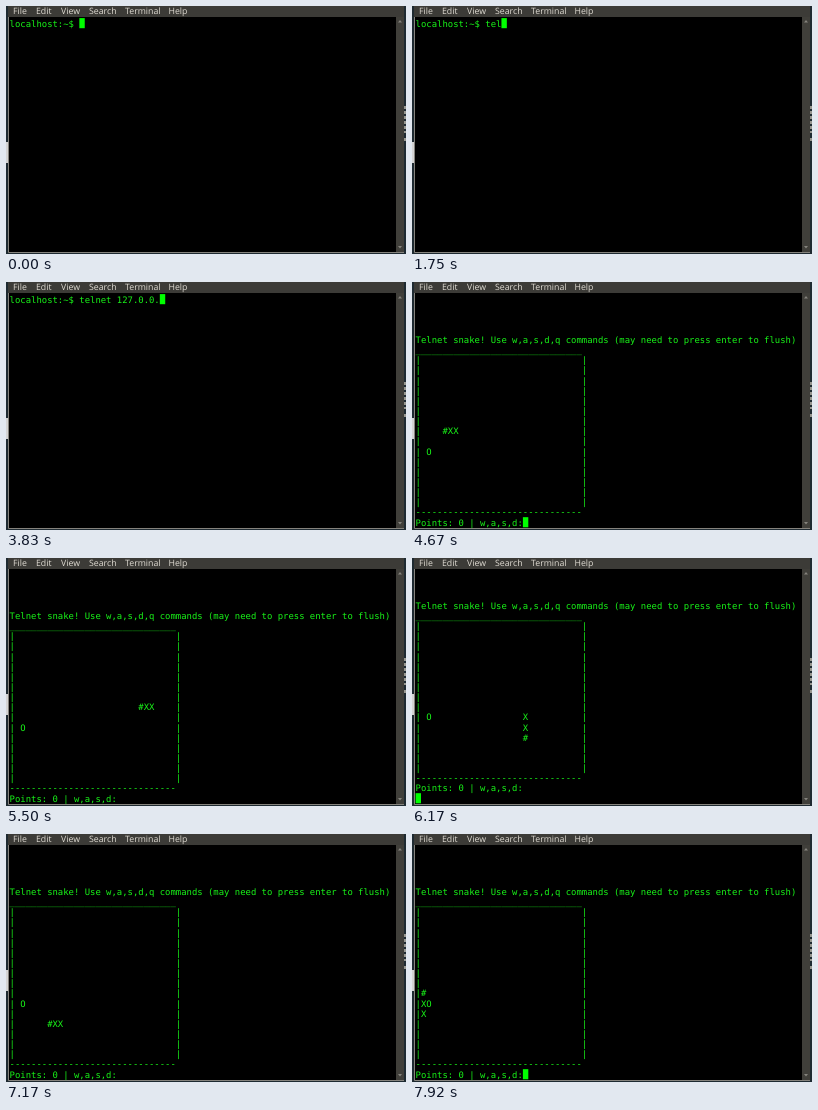
Animation, 400 px wide and 248 px high, one loop 8 s. Source, as an HTML page:

```html
<!DOCTYPE html>
<html lang="en">
<head>
<meta charset="utf-8">
<title>Telnet snake</title>
<style>
  html, body { margin: 0; width: 100%; height: 100%; overflow: hidden; background: #000; }
  svg { display: block; width: 400px; height: 248px; }
  text { white-space: pre; text-rendering: geometricPrecision; }
  .menu { font: 8.75px "Open Sans", "Noto Sans", sans-serif; fill: #dfdbd2; }
  .term { font: 8.911px "DejaVu Sans Mono", monospace; fill: #18f418; }
</style>
</head>
<body>
<svg viewBox="0 0 400 248">
  <rect width="400" height="248" fill="#1e2a31"/>
  <rect y="136" width="2" height="21" fill="#d4d4d4"/>
  <path d="M399 100v27M399 132v5" stroke="#96968f" stroke-width="2" stroke-dasharray="3 2"/>
  <rect x="2" width="396" height="247" fill="#3c3b37"/>
  <rect x="390" y="11" width="8" height="235" fill="#403f3a"/>
  <rect x="3" y="11" width="387" height="235" fill="#000"/>
  <path d="M2.5 11V246.5H398" fill="none" stroke="#85837d"/>
  <path d="M392 16.5l2-2.5 2 2.5zM392 240l2 2.5 2-2.5z" fill="#85837d"/>
  <g id="menu" class="menu"></g>
  <g id="screen" class="term"></g>
  <rect id="cursor" width="5.4" height="10.1" fill="#0f0"/>
</svg>
<script>
const LOOP = 8000, FRAME = 1000 / 12;
const CHAR = 5.365, LINE = 10.14, LEFT = 3.6, TOP = 12.1, ROWS = 23;

const COMMAND = "telnet 127.0.0.1 23";
// Key presses, counted in twelfths of a second
const KEYS = [15, 17, 20, 24, 26, 28, 30, 33, 35, 36, 38, 40, 42, 44, 46, 47, 49, 51, 53];
const FIRST_BLINK = -100, BLINK = 600;

const START = 56 * FRAME, TICK = 79, LEAD = 45;
const TURNS = [15, 19, 38];
const COLS = 30, FIRST_ROW = 6, LAST_ROW = 20;
const FOOD = [2, 15];
const STATUS = "Points: 0 | w,a,s,d:";

const $ = id => document.getElementById(id);

function addText(parent, x, y, content) {
  const el = document.createElementNS("http://www.w3.org/2000/svg", "text");
  el.setAttribute("x", x);
  el.setAttribute("y", y);
  el.textContent = content;
  parent.append(el);
  return el;
}

const menu = { File: 7, Edit: 30, View: 55, Search: 83, Terminal: 119, Help: 162.5 };
for (const name in menu) addText($("menu"), menu[name], 8, name);

const rows = Array.from({ length: ROWS }, (_, r) =>
  addText($("screen"), LEFT, TOP + r * LINE + 8.4, ""));

// Left through the wall, down, left again, then up along the edge
function snakeAt(k) {
  const [down, left, up] = TURNS;
  if (k <= down) return [(4 - k + COLS) % COLS + 1, 13];
  if (k <= left) return [20, 13 + k - down];
  if (k <= up) return [20 - (k - left), 17];
  return [1, 17 - (k - up)];
}

function board(k) {
  const lines = Array(ROWS).fill("");
  lines[4] = "Telnet snake! Use w,a,s,d,q commands (may need to press enter to flush)";
  lines[5] = "_".repeat(COLS + 1);
  for (let r = FIRST_ROW; r <= LAST_ROW; r++) lines[r] = "|" + " ".repeat(COLS) + "|";
  lines[21] = "-".repeat(COLS + 1);
  lines[22] = STATUS;
  const put = ([c, r], ch) => {
    lines[r] = lines[r].slice(0, c) + ch + lines[r].slice(c + 1);
  };
  put(FOOD, "O");
  put(snakeAt(k - 2), "X");
  put(snakeAt(k - 1), "X");
  put(snakeAt(k), "#");
  return lines;
}

function shell(frame) {
  const typed = KEYS.filter(key => key <= frame).length;
  const line = "localhost:~$ " + COMMAND.slice(0, typed);
  const lastKey = typed ? KEYS[typed - 1] * FRAME : FIRST_BLINK;
  return { lines: [line], col: line.length, row: 0, lastKey };
}

function game(time) {
  const k = Math.floor((time - START + LEAD) / TICK);
  const lines = board(k);
  const entered = TURNS.includes(k);
  if (entered) {
    lines.shift();
    lines.push("");
  }
  const turn = TURNS.filter(n => n <= k).pop();
  const lastKey = turn ? START - LEAD + turn * TICK : START;
  return { lines, col: entered ? 0 : STATUS.length, row: ROWS - 1, lastKey };
}

function draw(ms) {
  const frame = Math.floor((ms % LOOP + 4) / FRAME) % 96;
  const time = frame * FRAME;
  const state = frame < 56 ? shell(frame) : game(time);
  rows.forEach((el, r) => {
    const line = state.lines[r] || "";
    if (el.textContent !== line) el.textContent = line;
  });
  const lit = (time - state.lastKey) % (2 * BLINK) < BLINK;
  $("cursor").setAttribute("x", LEFT + state.col * CHAR);
  $("cursor").setAttribute("y", TOP + state.row * LINE);
  $("cursor").setAttribute("visibility", lit ? "visible" : "hidden");
}

const begin = performance.now();
function loop() {
  draw(performance.now() - begin);
  requestAnimationFrame(loop);
}
loop();
</script>
</body>
</html>
```
